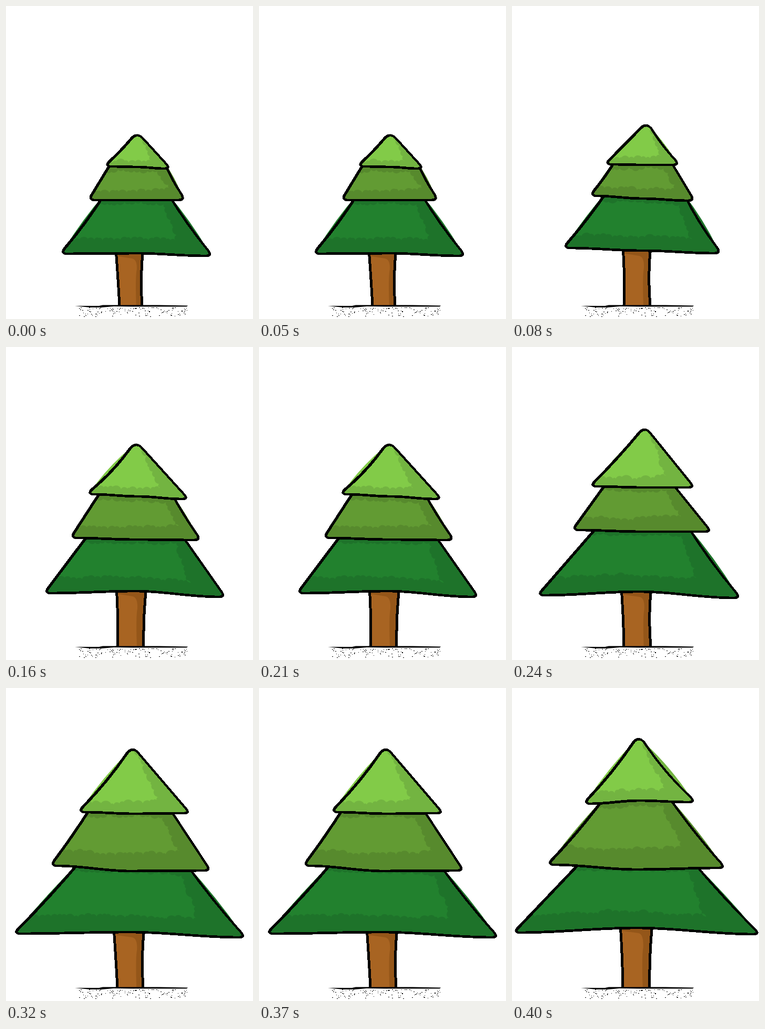
Recreate the animation shown at these times as an HTML page. Size 470 by 595 pixels, loop 480 ms.

```html
<!DOCTYPE html>
<html lang="en">
<head>
<meta charset="utf-8">
<title>Growing tree</title>
<style>
  html, body { margin: 0; width: 100%; height: 100%; overflow: hidden; background: #fff; }
  svg { display: block; width: 100%; height: 100%; }
  .pose { visibility: hidden; animation: pose 480ms step-end infinite; }
  .ink { fill: none; stroke: #000; stroke-width: 4; stroke-linejoin: round; stroke-linecap: round; shape-rendering: crispEdges; }
  @keyframes pose { 0% { visibility: visible; } 16.666%, 100% { visibility: hidden; } }
</style>
</head>
<body>
<svg id="stage" viewBox="0 0 470 595"></svg>
<script>
const stage = document.getElementById('stage');
const STEP = 80, GROUND = 569;
const BARK = { dark: '#945619', lit: '#a86422' };

// band: height of the bottom shade; lean: how far the lit area reaches right
const LEVELS = [
  { dark: '#1e732a', lit: '#22812e', band: 0.27, lean: 0.12 },
  { dark: '#578a2d', lit: '#629b33', band: 0.28, lean: 0.18 },
  { dark: '#73b441', lit: '#82cb48', band: 0.16, lean: 0.48 }
];

// Tiers run bottom to top. top: x of both shoulders, or the apex point;
// left, right: lower corners; mid: middle of the hem;
// spill: how far the colour runs past the ink on each side.
const POSES = [
  { trunk: [209, 261, 216, 259], tiers: [
    { top: [179, 317], left: [109, 471], right: [387, 475], mid: 470, spill: [5, 5] },
    { top: [196, 308], left: [162, 369], right: [335, 369], mid: 369, spill: [0, 4] },
    { apex: [250, 246], left: [193, 305], right: [308, 309], mid: 306, spill: [2, 0] }] },
  { trunk: [211, 264, 213, 263], tiers: [
    { top: [174, 335], left: [103, 460], right: [392, 470], mid: 465, spill: [4, 6] },
    { top: [191, 306], left: [154, 361], right: [342, 370], mid: 366, spill: [3, 0] },
    { apex: [256, 227], left: [182, 301], right: [313, 302], mid: 302, spill: [0, 4] }] },
  { trunk: [210, 267, 212, 262], tiers: [
    { top: [152, 341], left: [78, 468], right: [412, 475], mid: 464, spill: [0, 0] },
    { top: [177, 322], left: [128, 363], right: [365, 367], mid: 366, spill: [0, 3] },
    { apex: [248, 186], left: [160, 280], right: [342, 289], mid: 284, spill: [7, 0] }] },
  { trunk: [208, 265, 213, 264], tiers: [
    { top: [157, 342], left: [54, 472], right: [429, 477], mid: 465, spill: [0, 6] },
    { top: [175, 311], left: [120, 348], right: [374, 351], mid: 351, spill: [0, 0] },
    { apex: [253, 157], left: [154, 265], right: [342, 267], mid: 267, spill: [3, 0] }] },
  { trunk: [205, 263, 212, 261], tiers: [
    { top: [133, 353], left: [20, 467], right: [450, 474], mid: 464, spill: [4, 5] },
    { top: [155, 317], left: [90, 338], right: [384, 347], mid: 348, spill: [3, 0] },
    { apex: [241, 117], left: [143, 236], right: [345, 238], mid: 239, spill: [6, 0] }] },
  { trunk: [206, 267, 211, 262], tiers: [
    { top: [126, 355], left: [8, 465], right: [466, 468], mid: 456, spill: [0, 4] },
    { top: [166, 306], left: [73, 336], right: [400, 342], mid: 345, spill: [5, 5] },
    { apex: [241, 97], left: [142, 220], right: [343, 217], mid: 214, spill: [6, 8] }] }
];

let seed = 11;
const rand = () => (seed = seed * 16807 % 2147483647) / 2147483647;
const dist = (a, b) => Math.hypot(a[0] - b[0], a[1] - b[1]);
const mix = (a, b, t) => a + (b - a) * t;
const toward = (a, b, d) => a.map((v, i) => mix(v, b[i], d / dist(a, b)));

function add(parent, tag, attrs) {
  const el = document.createElementNS('http://www.w3.org/2000/svg', tag);
  for (const k in attrs) el.setAttribute(k, attrs[k]);
  return parent.appendChild(el);
}

function ink(g, d) {
  for (const s of [-0.5, 0.5]) add(g, 'path', { class: 'ink', d, transform: `translate(${s} ${s * 0.8})` });
}

// Slightly bowed line from a to b; positive bow swells outwards.
function side(a, b, bow) {
  const k = 2 * bow / dist(a, b);
  const cx = (a[0] + b[0]) / 2 - (b[1] - a[1]) * k;
  const cy = (a[1] + b[1]) / 2 + (b[0] - a[0]) * k;
  return `Q${cx} ${cy} ${b}`;
}

// Rounded tier; swell scales the bow of both sides.
function outline(t, shoulders, swell) {
  const cut = 12;
  const l = [t.left[0] - 5, t.left[1]], r = [t.right[0] + 5, t.right[1]];
  const tip = t.apex && [t.apex[0], t.apex[1] - 6];
  const a = tip ? toward(tip, l, 16) : toward(shoulders[0], l, -14);
  const b = tip ? toward(tip, r, 16) : toward(shoulders[1], r, -14);
  const m = [(l[0] + r[0]) / 2, t.mid], h = (r[0] - l[0]) / 6;
  const rise = toward(r, b, cut);
  return `M${a}` + side(a, toward(l, a, cut), t.spill[0] * swell) +
    `Q${l} ${l[0] + cut} ${l[1]}` +
    `C${l[0] + cut + h} ${l[1]} ${m[0] - h} ${m[1]} ${m}` +
    `C${m[0] + h} ${m[1]} ${r[0] - cut - h} ${r[1]} ${r[0] - cut} ${r[1]}` +
    `Q${r} ${rise}` + side(rise, b, t.spill[1] * swell) +
    (tip ? `Q${tip} ${a}` : '') + 'Z';
}

// Lit area whose edge is bitten by small leafy puffs.
function leafy(p) {
  let d = 'M' + p[0], from = p[0];
  for (let i = 1; i < p.length; i++) {
    const n = Math.max(1, Math.round(dist(p[i - 1], p[i]) / 11));
    for (let j = 1; j <= n; j++) {
      const t = (j + (rand() - 0.5) * 0.5) / n;
      const to = p[i].map((v, k) => mix(p[i - 1][k], v, t) + (rand() - 0.5) * 6);
      const r = dist(from, to) * 0.6;
      d += `A${r} ${r} 0 0 0 ${to}`;
      from = to;
    }
  }
  return d + `L${from[0]} ${p[0][1]}Z`;
}

function litEdge(t, shoulders, { band, lean }) {
  const [a, b] = shoulders;
  const shade = (t.mid - b[1]) * band;
  const end = [mix(b[0], t.right[0], lean), t.right[1] - shade - 4];
  const low = [[(t.left[0] + end[0]) / 2, t.mid - shade], [t.left[0] - 10, t.left[1] - shade]];
  if (t.apex) return [[b[0] + 2, b[1] - 10], end, ...low];
  return [[a[0] - 18, a[1] + 7], [b[0] - 18, b[1] + 5], end, ...low];
}

function drawTier(g, id, t, above, level) {
  const shoulders = t.apex ? [t.apex, t.apex] : [[t.top[0], above.left[1]], [t.top[1], above.right[1]]];
  const d = outline(t, shoulders, 0.5);
  add(add(g, 'clipPath', { id }), 'path', { d });
  add(g, 'path', { d, fill: level.dark });
  add(g, 'path', { d: leafy(litEdge(t, shoulders, level)), fill: level.lit, 'clip-path': `url(#${id})` });
  ink(g, outline(t, shoulders, -0.5));
}

function drawTrunk(g, [l, r, footL, footR], hem) {
  const y = hem - 8, bend = (y + GROUND) / 2;
  const left = `M${l} ${y}Q${l + 4} ${bend} ${footL} ${GROUND}`;
  const right = `Q${r - 6} ${bend} ${r} ${y}`;
  const edge = mix(footL, footR, 0.74);
  add(g, 'path', { d: `${left}H${footR}${right}Z`, fill: BARK.dark });
  add(g, 'path', { d: `${left}H${edge}Q${edge - 2} ${bend} ${edge + 1} ${bend - 15}Q${edge + 2} ${hem + 12} ${edge - 8} ${hem + 10}L${l} ${hem + 5}Z`, fill: BARK.lit });
  ink(g, left);
  ink(g, `M${footR} ${GROUND}${right}`);
}

POSES.forEach(({ trunk, tiers }, i) => {
  const delay = (i - POSES.length) * STEP;
  const g = add(stage, 'g', { class: 'pose', style: `animation-delay:${delay}ms` });
  drawTrunk(g, trunk, tiers[0].mid);
  tiers.forEach((t, k) => drawTier(g, `tier${i}-${k}`, t, tiers[k + 1], LEVELS[k]));
});

// Ground line and speckled soil, thinning out with depth
add(stage, 'path', { d: 'M131 570L177 570L184 568.5L292 568.5L346 569.5L344 571.5L240 571.5L205 571L182 573L160 573Z' });
let soil = '';
for (let i = 0; i < 125; i++) {
  const x = Math.round(135 + rand() * 210), y = Math.round(573 + 18 * rand() ** 1.6);
  soil += `M${x} ${y + 0.5}h${rand() < 0.5 ? 2 : 1}`;
}
add(stage, 'path', { d: soil, stroke: '#000', 'stroke-width': 1.2 });
</script>
</body>
</html>
```
